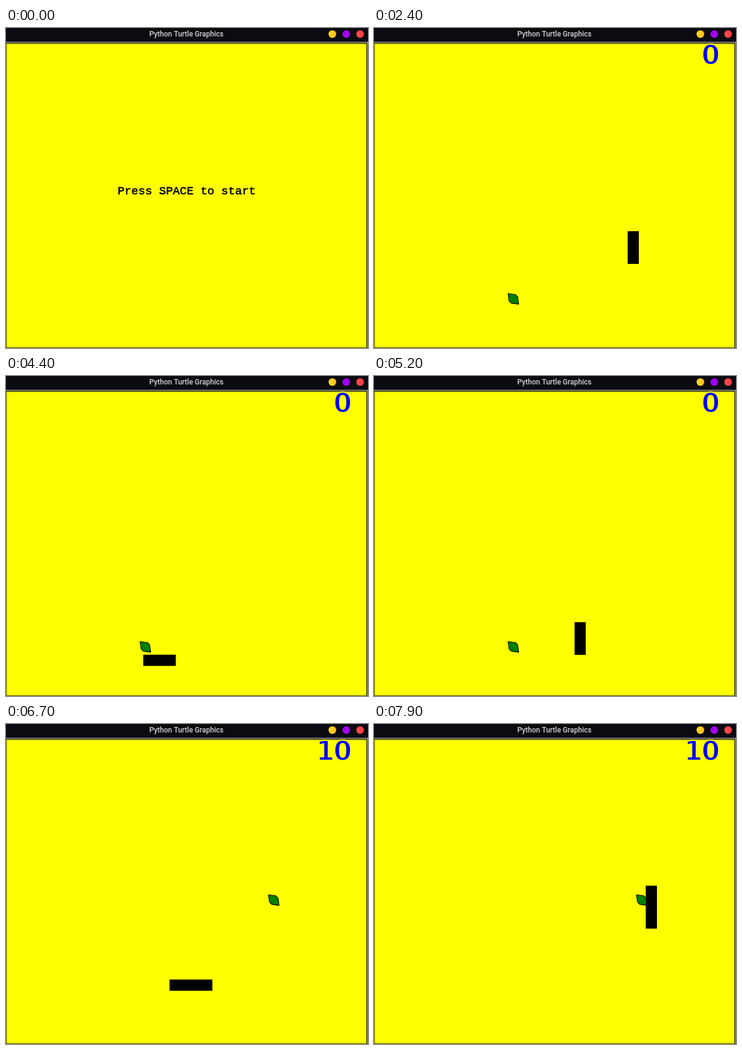
An HTML page with a canvas that plays this animation: 600 px wide and 529 px high, repeating every 8000 ms.

```html
<!DOCTYPE html>
<html lang="en">
<head>
<meta charset="utf-8">
<title>Turtle game</title>
<style>
  html, body { margin: 0; overflow: hidden; }
  canvas { display: block; }
</style>
</head>
<body>
<canvas id="stage" width="600" height="529"></canvas>
<script>
const ctx = document.getElementById('stage').getContext('2d');
const LOOP = 8000, STEP = 100, TURN_PAUSE = 15;
const START = 600, SCORED = 800, LEAF_SHOWN = 1000, EATEN = 6000, GROWN = 6300;

// Each run goes right first; "turns" holds the x or y where the heading changes, alternately
const hungry = {
  begin: 1018, speed: 0.157, length: 54, x: 299.5, y: 278.5,
  turns: [429.7, 428.2, 250, 464, 244.5, 470, 341.7, 427, 238.5, 431.7]
};
const fed = {
  begin: 6414, speed: 0.238, length: 71, x: 238.5, y: 431.7,
  turns: [459.7, 302.5]
};

function rect(color, x, y, w, h) {
  ctx.fillStyle = color;
  ctx.fillRect(x, y, w, h);
}

function text(string, x, y, font, color, align = 'center') {
  ctx.font = font;
  ctx.fillStyle = color;
  ctx.textAlign = align;
  ctx.fillText(string, x, y);
}

function outline(string, x, y, color, width) {
  ctx.strokeStyle = color;
  ctx.lineWidth = width;
  ctx.lineJoin = 'round';
  ctx.strokeText(string, x, y);
}

function button(x, left, right) {
  const fill = ctx.createLinearGradient(x - 6, 0, x + 6, 0);
  fill.addColorStop(0, left);
  fill.addColorStop(1, right);
  ctx.fillStyle = fill;
  ctx.beginPath();
  ctx.arc(x, 10, 6.3, 0, 2 * Math.PI);
  ctx.fill();
}

function drawWindow() {
  rect('#0b0c12', 0, 0, 600, 529);
  rect('#d0d0c8', 0, 23, 600, 1);
  rect('#d0d0c8', 599, 23, 1, 506);
  rect('#80800a', 0, 25, 598, 504);
  rect('#ffff00', 1.5, 26.5, 595.5, 501);
  text('Python Turtle Graphics', 299, 14, '500 12px Roboto, sans-serif', '#d4d4d6');
  button(541, '#ffdc20', '#ffb91c');
  button(564, '#9a00ff', '#a800e4');
  button(587, '#ff4a50', '#ff3c3c');
}

function drawPrompt() {
  const prompt = 'Press SPACE to start';
  text(prompt, 299.5, 275, '19.1px "Liberation Mono", monospace', '#000');
  outline(prompt, 299.5, 275, '#000', 0.6);
}

// A background-coloured outline thins the bold strokes
function drawScore(score) {
  ctx.letterSpacing = '-2px';
  text(score, 571.3, 60.3, 'bold 44px "DejaVu Sans", sans-serif', '#0000ff', 'right');
  outline(score, 571.3, 60.3, '#ffff00', 2);
  ctx.letterSpacing = '0px';
}

function drawLeaf(x, y) {
  ctx.save();
  ctx.translate(x, y);
  ctx.scale(0.88, 0.88);
  ctx.fillStyle = '#008000';
  ctx.strokeStyle = '#000';
  ctx.lineWidth = 1.25;
  const leaf = new Path2D('M0 0L14 2 18 6 20 20 6 18 2 14Z');
  ctx.fill(leaf);
  ctx.stroke(leaf);
  ctx.restore();
}

function drawCaterpillar(run, time) {
  let { x, y } = run, across = true, left = Math.max(0, time - run.begin);
  for (const [i, goal] of run.turns.entries()) {
    across = i % 2 === 0;
    const way = goal - (across ? x : y);
    const move = Math.sign(way) * Math.min(Math.abs(way), left * run.speed);
    if (across) x += move;
    else y += move;
    left -= Math.abs(way) / run.speed + TURN_PAUSE;
    if (left <= 0) break;
  }
  const [w, h] = across ? [run.length, 18.5] : [18.5, run.length];
  rect('#000', x - w / 2, y - h / 2, w, h);
}

function draw(now) {
  const time = Math.floor(now % LOOP / STEP) * STEP;
  const grown = time >= GROWN;
  drawWindow();
  if (time < START) return drawPrompt();
  if (time >= SCORED) drawScore(grown ? '10' : '0');
  if (grown) drawLeaf(435, 282.3);
  else if (time >= LEAF_SHOWN && time < EATEN) drawLeaf(222.2, 439);
  drawCaterpillar(grown ? fed : hungry, time);
}

const began = performance.now();
function frame() {
  draw(performance.now() - began);
  requestAnimationFrame(frame);
}
frame();
</script>
</body>
</html>
```
